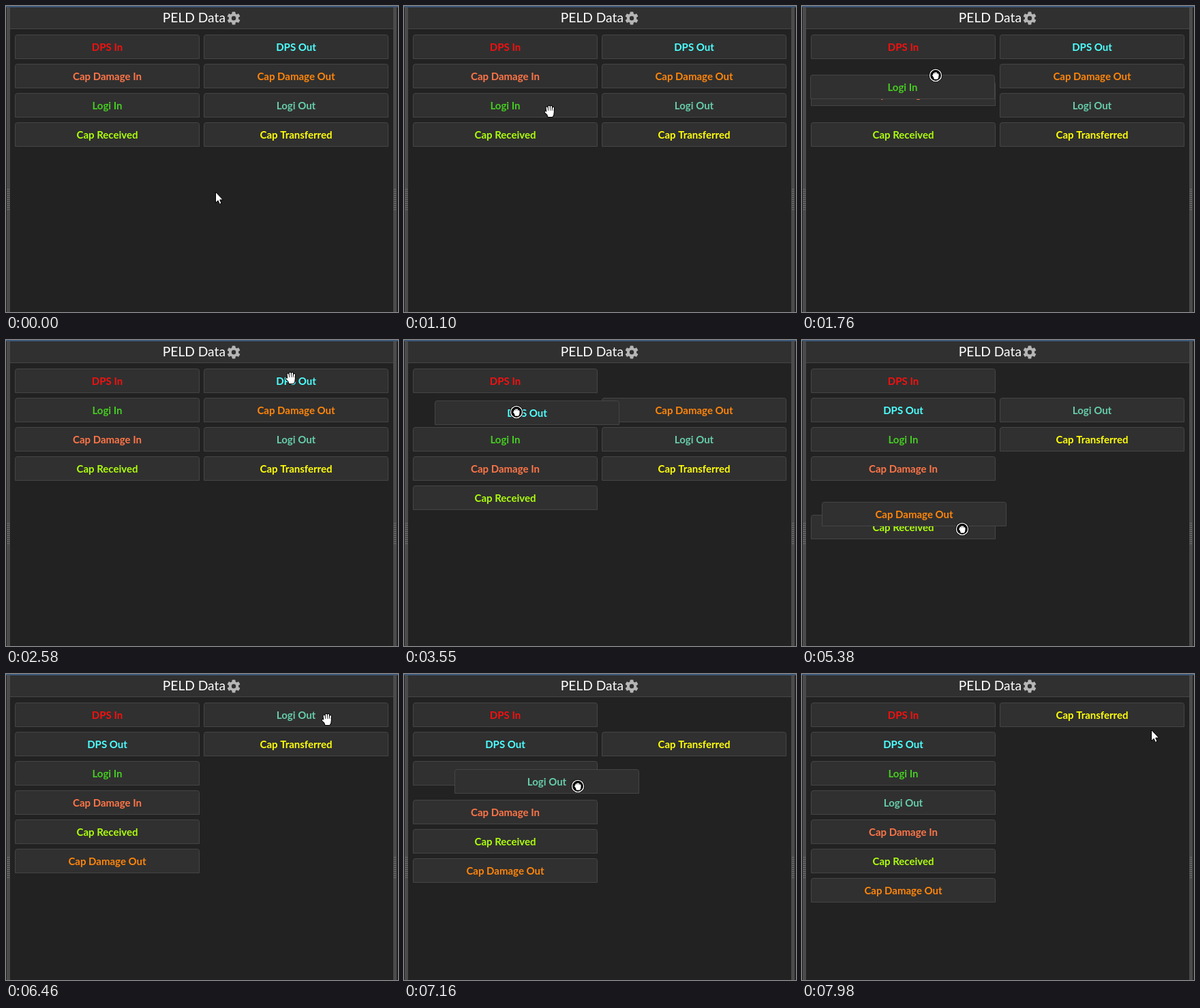
These frames come from a looping animation (575x450 px, 8 s). An HTML page with a canvas:

```html
<!DOCTYPE html>
<html lang="en">
<head>
<meta charset="utf-8">
<title>PELD Data</title>
<style>
html, body { margin: 0; width: 100%; height: 100%; overflow: hidden; background: #222; }
canvas { display: block; width: 575px; height: 450px; }
</style>
</head>
<body>
<canvas id="stage"></canvas>
<script>
const LOOP = 8000, SETTLE = 300;
const ITEM_W = 271, ITEM_H = 36;
const canvas = document.getElementById('stage');
const ctx = canvas.getContext('2d');
const dpr = window.devicePixelRatio || 1;
canvas.width = 575 * dpr;
canvas.height = 450 * dpr;

const items = {
  A: ['DPS In', '#f51010'],
  B: ['Cap Damage In', '#ff7547'],
  C: ['Logi In', '#46cc22'],
  D: ['Cap Received', '#adff0a'],
  E: ['DPS Out', '#4dffff'],
  F: ['Cap Damage Out', '#ff850a'],
  G: ['Logi Out', '#66cdaa'],
  H: ['Cap Transferred', '#ffff0a']
};

// Order of both columns from a time on; a dot is an empty slot
const layouts = [
  [0, 'ABCD', 'EFGH'],
  [1655, 'ACBD', 'EFGH'],
  [3270, 'AECBD', '.FGH'],
  [4100, 'AECBD', 'FGH'],
  [5090, 'AECBFD', '.GH'],
  [5520, 'AECBDF', '.GH'],
  [5700, 'AECBDF', 'GH'],
  [7000, 'AECGBDF', '.H'],
  [7350, 'AECGBDF', 'H']
];

// off: pointer position within the item once it follows
const drags = [
  { id: 'C', t: 1360, end: 2000, off: [184, 1] },
  { id: 'E', t: 3040, end: 4100, off: [120, 17] },
  { id: 'F', t: 4720, end: 5700, off: [206, 40] },
  { id: 'G', t: 6700, end: 7350, off: [181, 25] }
];

// Pointer path: [time, x, y]
const path = [
  [430, 307, 273], [900, 235, 180], [1250, 197, 135], [1400, 197, 135],
  [1760, 196, 102], [2000, 192, 92], [2300, 300, 76], [2580, 418, 56],
  [3000, 418, 56], [3040, 410, 59], [3295, 250, 88], [3550, 165, 106],
  [3670, 150, 106], [4100, 140, 103], [4308, 230, 92], [4565, 440, 70],
  [4720, 496, 64], [5080, 370, 170], [5380, 235, 278], [5680, 215, 314],
  [6160, 420, 146], [6460, 471, 67], [6690, 471, 67], [7063, 255, 165],
  [7330, 190, 196], [7710, 408, 128], [7980, 512, 82]
];

// Screen refreshes: [time, equal steps since the entry before]
const beats = [
  [560, 1], [1500, 7], [1640, 1], [1880, 2], [2580, 5], [3040, 1],
  [3550, 4], [4030, 4], [4180, 1], [5080, 7], [5380, 2], [6160, 6],
  [6460, 2], [6740, 1], [7710, 6], [7980, 2]
];

const mix = (a, b, k) => a.map((v, i) => v + (b[i] - v) * k);
const sub = (a, b) => a.map((v, i) => v - b[i]);

// CSS "ease": cubic-bezier(.25, .1, .25, 1)
function ease(x) {
  if (x <= 0) return 0;
  if (x >= 1) return 1;
  let lo = 0, hi = 1;
  for (let i = 0; i < 20; i++) {
    const s = (lo + hi) / 2;
    if (0.75 * s * (1 - s) + s ** 3 < x) lo = s; else hi = s;
  }
  return 0.3 * lo * (1 - lo) ** 2 + 3 * lo * lo * (1 - lo) + lo ** 3;
}

function snap(t) {
  let from = 0;
  for (const [to, n] of beats) {
    const gap = (to - from) / n;
    if (t < to) return from + Math.floor((t - from) / gap + 1e-6) * gap;
    from = to;
  }
  return from;
}

function pointer(t) {
  const i = path.findIndex(k => k[0] > t);
  const b = path.at(i), a = path[Math.max(0, i - 1)];
  if (i < 1) return b.slice(1);
  return mix(a.slice(1), b.slice(1), (t - a[0]) / (b[0] - a[0]));
}

function slot(id, cols) {
  const col = cols[0].includes(id) ? 0 : 1;
  return [13 + 277 * col, 42 + 43 * cols[col].indexOf(id)];
}

function home(id, t) {
  let p, last;
  for (const [start, ...cols] of layouts) {
    if (start > t) break;
    const s = slot(id, cols);
    if (!p) p = s;
    else if (String(s) !== last) p = mix(p, s, ease((t - start) / SETTLE));
    last = String(s);
  }
  return p;
}

function place(id, t) {
  let p = home(id, t);
  const d = drags.find(d => d.id === id);
  if (d && t >= d.t && t < d.end + SETTLE) {
    const now = Math.min(t, d.end);
    const grip = sub(pointer(d.t), home(id, d.t));
    const held = sub(pointer(now), mix(grip, d.off, Math.min(1, (now - d.t) / 400)));
    p = mix(held, p, ease((t - d.end) / SETTLE));
  }
  return p.map(Math.round);
}

function rect(x, y, w, h, color) {
  ctx.fillStyle = color;
  ctx.fillRect(x, y, w, h);
}

function disc(r, color) {
  ctx.beginPath();
  ctx.arc(0, 0, r, 0, 7);
  ctx.fillStyle = color;
  ctx.fill();
}

function poly(...points) {
  ctx.beginPath();
  points.forEach(p => ctx.lineTo(...p));
  ctx.closePath();
  ctx.fill();
  ctx.stroke();
}

function text(s, x, y, font, color, align) {
  ctx.font = font + ' Lato, sans-serif';
  ctx.fillStyle = color;
  ctx.textAlign = align;
  ctx.fillText(s, x, y);
}

function gear(x, y) {
  ctx.save();
  ctx.translate(x, y);
  disc(7.2, '#b5b5b5');
  for (let i = 0; i < 6; i++) {
    ctx.beginPath();
    ctx.roundRect(-2.5, -9.6, 5, 6, 1);
    ctx.fill();
    ctx.rotate(Math.PI / 3);
  }
  disc(3.2, '#303030');
  ctx.restore();
}

function splitter(x) {
  rect(x, 2, 5, 448, '#4b4b4b');
  for (let y = 269; y < 300; y += 3) {
    for (let i = 0; i < 2; i++) rect(x + 1 + i * 2, y, 1, 1, '#8c8c8c');
  }
}

function frame() {
  rect(0, 0, 575, 450, '#222');
  rect(6, 2, 562, 32, '#303030');
  rect(6, 33, 562, 1, '#464646');
  rect(0, 0, 575, 2, '#3d5878');
  splitter(1);
  splitter(568);
  text('PELD Data', 229.8, 24, '19.2px', '#fff', 'left');
  gear(334, 18);
}

function button([label, color], [x, y]) {
  ctx.beginPath();
  ctx.roundRect(x + 0.5, y + 0.5, ITEM_W - 1, ITEM_H - 1, [3, 3, 0, 0]);
  ctx.fillStyle = '#303030';
  ctx.fill();
  ctx.strokeStyle = '#454545';
  ctx.lineWidth = 1;
  ctx.stroke();
  text(label, x + ITEM_W / 2, y + 24, 'bold 15px', color, 'center');
}

function arrow() {
  ctx.fillStyle = '#fff';
  ctx.strokeStyle = '#000';
  ctx.lineWidth = 1;
  poly([0.5, 0.5], [0.5, 16.5], [4, 13], [6.4, 18.4], [9, 17.3], [6.7, 12], [11.3, 12]);
}

// Four fingers and a thumb: a wide dark pass for the outline, then white
function hand(reach, spread) {
  ctx.lineCap = ctx.lineJoin = 'round';
  for (const [color, width] of [['#000', 4.1], ['#fff', 2.1]]) {
    ctx.strokeStyle = ctx.fillStyle = color;
    ctx.lineWidth = width;
    ctx.beginPath();
    for (let i = 0; i < 4; i++) {
      const x = (i - 1.4) * 2.5;
      ctx.moveTo(x * spread, -reach + (i - 1.4) ** 2);
      ctx.lineTo(x, 2);
    }
    ctx.moveTo(-5 * spread, 1);
    ctx.lineTo(-2.5, 4.5);
    ctx.stroke();
    poly([-3.5, 0], [4.8, 0], [4.2, 5], [3, 7], [-2, 7]);
  }
}

function fist() {
  disc(10, '#000');
  disc(9.2, '#fff');
  disc(7.9, '#000');
  ctx.scale(0.8, 0.8);
  ctx.translate(0, -1);
  hand(4.2, 1);
}

function draw(t) {
  const held = drags.find(d => t >= d.t && t < d.end);
  const top = drags.find(d => t >= d.t && t < d.end + SETTLE);
  const ids = Object.keys(items).filter(id => !top || id !== top.id);
  if (top) ids.push(top.id);
  const [px, py] = pointer(t).map(Math.round);
  let over = false;

  ctx.setTransform(dpr, 0, 0, dpr, 0, 0);
  frame();
  for (const id of ids) {
    const p = place(id, t);
    const [dx, dy] = sub([px, py], p);
    over = over || (dx >= 0 && dx < ITEM_W && dy >= 0 && dy < ITEM_H);
    button(items[id], p);
  }
  ctx.translate(px, py);
  if (held) fist();
  else if (over) hand(7.4, 1.25);
  else arrow();
}

function tick() {
  draw(snap(performance.now() % LOOP));
  requestAnimationFrame(tick);
}
tick();
</script>
</body>
</html>
```
